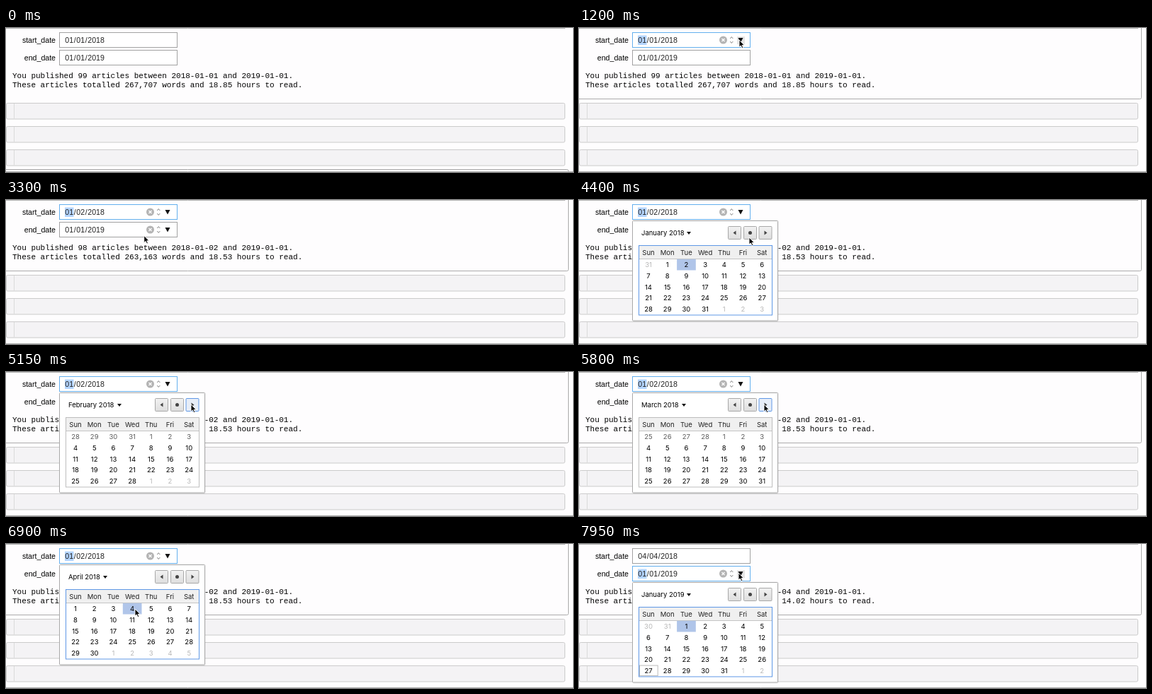
An HTML page that plays this animation: 800 px wide and 204 px high, repeating every 8 s.

```html
<!DOCTYPE html>
<html lang="en">
<head>
<meta charset="utf-8">
<title>Date range picker</title>
<style>
html, body { margin: 0; width: 100%; height: 100%; overflow: hidden; background: #fefdfe; }
svg { display: block; width: 800px; height: 204px; }
text { white-space: pre; }
.mono { font: 11px "Liberation Mono", monospace; }
.sans { font: 10.6px "Liberation Sans", sans-serif; }
.ui { font: 9.5px Inter, sans-serif; }
</style>
</head>
<body>
<svg id="stage" viewBox="0 0 800 204"></svg>
<script>
const LOOP = 8000, BLUE = '#5e97e6', GREY = 184;
const stage = document.getElementById('stage');

// Pointer tip: time, x, y
const path = [
  [50, 30, 143], [850, 228, 16], [900, 228, 16], [1050, 226, 17], [1350, 226, 17],
  [2000, 168, 75], [2250, 155, 93], [2900, 155, 93], [3650, 227, 16], [4000, 227, 16],
  [4400, 240, 53], [4750, 261, 46], [6150, 261, 46], [6650, 182, 92], [7300, 182, 92],
  [7650, 225, 41], [8000, 225, 41]
];

const T = {
  focusStart: 1200, open1: 1250, press1: 2550, close1: 2650, text1: 2700,
  open2: 3950, feb: 4850, mar: 5500, apr: 6100, press2: 6850,
  close2: 6950, text2: 7000, focusEnd: 7800, open3: 7850
};

const smooth = k => k * k * (3 - 2 * k);
const within = (t, a, b) => t >= a && t < b;
const gray = v => `rgb(${v},${v},${v})`;

function pointerAt(t) {
  if (t < path[0][0]) return null;
  const i = path.findIndex(p => p[0] > t);
  const [t0, x0, y0] = path[i - 1], [t1, x1, y1] = path[i];
  const k = smooth((t - t0) / (t1 - t0));
  return { x: x0 + (x1 - x0) * k, y: y0 + (y1 - y0) * k };
}

const rect = (x, y, w, h, fill, stroke = 'none', r = 0) =>
  `<rect x="${x}" y="${y}" width="${w}" height="${h}" rx="${r}" fill="${fill}" stroke="${stroke}"/>`;
const shape = (d, fill, stroke = 'none', w = 1) =>
  `<path d="${d}" fill="${fill}" stroke="${stroke}" stroke-width="${w}"/>`;
const text = (x, y, s, cls, anchor = 'start', fill = '#000') =>
  `<text x="${x}" y="${y}" class="${cls}" text-anchor="${anchor}" fill="${fill}">${s}</text>`;
const circle = (x, y, r, fill) => `<circle cx="${x}" cy="${y}" r="${r}" fill="${fill}"/>`;

function notebook(t) {
  let s = shape('M0 .5H789', 'none', '#b5b5b5');
  for (const y of [106.5, 139.5, 172.5])
    s += rect(.5, y, 788, 22.5, '#f4f3f5', '#cbcbcb', 2) +
      shape(`M11.5 ${y + .5}v21.5`, 'none', '#dadada');
  s += t < T.focusStart
    ? shape('M0 200.5H791.5Q793.5 200.5 793.5 202.5V204', 'none', '#a5a5a5')
    : shape('M793.5 0V98.5Q793.5 100.5 791.5 100.5H0', 'none', '#ababab');
  return s + shape('M0 203.5H800', 'none', '#b0b0b0');
}

function report(t) {
  const [n, day, words, hours] = t < T.text1 ? [99, '01-01', '267,707', '18.85']
    : t < T.text2 ? [98, '01-02', '263,163', '18.53'] : [75, '04-04', '199,112', '14.02'];
  return text(9, 71, `You published ${n} articles between 2018-${day} and 2019-01-01.`, 'mono') +
    text(9, 84, `These articles totalled ${words} words and ${hours} hours to read.`, 'mono');
}

function field(label, y, value, focused, p) {
  const hover = p && within(p.x, 76, 242) && within(p.y, y, y + 21);
  const [m, d, yr] = value;
  let s = text(70, y + 13.5, label, 'sans', 'end') +
    rect(75.5, y - .5, 166, 21, '#fff', focused ? '#64b0ee' : '#a2a2a2');
  if (focused) s += rect(83, y + 3.5, 12.5, 13.5, '#b4d5fe');
  [[83.3, m], [95.7, '/'], [99.3, d], [111.7, '/'], [115.3, yr]]
    .forEach(([x, v]) => s += text(x, y + 13.6, v, 'sans', 'start', '#222'));
  if (hover || focused) {
    const c = y + 10;
    if (hover && p.x > 222) s += rect(223, c - 5, 11, 11, '#e6e6e6');
    s += circle(203.5, c, 5.5, '#b4b4b4') +
      shape(`M201.5 ${c - 2}l4 4m0-4l-4 4`, 'none', '#fff', 1.3) +
      shape(`M213.3 ${c - 2}l2-2.4 2 2.4M213.3 ${c + 2}l2 2.4 2-2.4`, 'none', '#777', .9) +
      shape(`M224.5 ${c - 3}h7l-3.5 6.5z`, '#111');
  }
  return s;
}

function button(x, y, icon, focused) {
  return rect(x + .5, y + .5, 18, 18, focused ? '#e7edf7' : 'url(#btn)', focused ? BLUE : '#a8a8a8', 1) + icon;
}

function calendar(t, o) {
  const { dy, year, month, selected, arrow, gridFocus, p, today, fade } = o;
  const names = ['January', 'February', 'March', 'April'];
  const first = new Date(year, month, 1).getDay();
  const top = dy + 64.5, pitch = 15.7, col = 26.7, line = gridFocus ? BLUE : '#bdbdbd';
  const sameDay = (d, md) => md && d.getMonth() === md[0] && d.getDate() === md[1];
  const c = dy + 46.5;

  let s = rect(75.5, dy + 28.5, 206, 144, '#000', 'none', 2).replace('/>', ' opacity=".08"/>') +
    rect(75.5, dy + 29.5, 205, 141.5, '#fff', '#a9a9a9', 1) +
    text(88, dy + 50.3, `${names[month]} ${year}`, 'ui') +
    shape(`M${arrow - 3} ${dy + 45}h6l-3 4z`, '#111') +
    button(210, dy + 37, shape(`M221.5 ${c - 3}v6l-4-3z`, '#444'), false) +
    button(232, dy + 37, circle(241.5, c, 2.5, '#444'), false) +
    button(253.5, dy + 37, shape(`M261.5 ${c - 3}v6l4-3z`, '#444'), !gridFocus) +
    rect(85, top, 187, 19, '#f0f0f0') + shape(`M85 ${top + 19}h187`, 'none', '#c4c4c4');

  'Sun Mon Tue Wed Thu Fri Sat'.split(' ').forEach((d, i) =>
    s += text(98 + col * i, dy + 77.7, d, 'ui', 'middle', '#222'));

  for (let i = 0; i < 35; i++) {
    const d = new Date(year, month, 1 - first + i);
    const c = i % 7, r = i / 7 | 0;
    const x = 84.7 + col * c, y = top + 19.3 + pitch * r;
    const inside = d.getMonth() === month;
    const hovered = p && within(p.x, x, x + col) && within(p.y, y, y + pitch);
    if (sameDay(d, selected)) s += rect(x, y, col, pitch, '#b0c5e9');
    else if (hovered) s += rect(x, y, col, pitch, '#dfe8f8');
    if (sameDay(d, today)) s += rect(x + .8, y + .5, col - 1, pitch - 1.2, 'none', '#bbb');
    let shade = inside ? 0 : GREY;
    // Days carried over from the previous month ease to their new shade
    if (fade && r === 0) {
      const left = (1 - Math.min(1, (t - fade) / 1000)) ** 2;
      shade = Math.round(shade + (GREY - 2 * shade) * left);
    }
    s += text(98 + col * c, y + 11.4, d.getDate(), 'ui', 'middle', gray(shade));
  }
  return s + rect(84.5, top, 188, 98.5, 'none', line);
}

function popup(t, p) {
  const base = { dy: 0, year: 2018, month: 0, arrow: 155, gridFocus: true, p };
  if (within(t, T.open1, T.close1))
    return calendar(t, { ...base, selected: [0, t < T.press1 ? 1 : 2] });
  if (within(t, T.open2, T.close2)) {
    if (t < T.feb) return calendar(t, { ...base, selected: [0, 2] });
    const o = { ...base, gridFocus: t >= T.press2 };
    if (t < T.mar) return calendar(t, { ...o, month: 1, arrow: 160, fade: T.feb });
    if (t < T.apr) return calendar(t, { ...o, month: 2, arrow: 148, fade: T.mar });
    return calendar(t, { ...o, month: 3, arrow: 140, selected: t >= T.press2 ? [3, 4] : null });
  }
  if (t >= T.open3)
    return calendar(t, { ...base, dy: 25, year: 2019, selected: [0, 1], today: [0, 27] });
  return '';
}

function pointer(p) {
  return p ? `<g transform="translate(${p.x} ${p.y})">` +
    '<path d="M0 0V10L2.3 7.9 4 11.6 5.7 10.8 4.1 7.3H7.2Z" fill="#000" stroke="#fff" stroke-width=".9"/></g>' : '';
}

function draw(t) {
  const p = pointerAt(t);
  const start = t < T.close1 ? ['01', '01', '2018'] : t < T.close2 ? ['01', '02', '2018'] : ['04', '04', '2018'];
  stage.innerHTML =
    '<defs><linearGradient id="btn" x2="0" y2="1"><stop stop-color="#f2f2f2"/><stop offset="1" stop-color="#dedede"/></linearGradient></defs>' +
    rect(0, 0, 800, 204, '#fefdfe') + notebook(t) + report(t) +
    field('start_date', 7, start, within(t, T.focusStart, T.focusEnd), p) +
    field('end_date', 32, ['01', '01', '2019'], t >= T.focusEnd, p) +
    popup(t, p) + pointer(p);
}

const begin = performance.now();
function tick() {
  draw((performance.now() - begin) % LOOP);
  requestAnimationFrame(tick);
}
tick();
</script>
</body>
</html>
```
